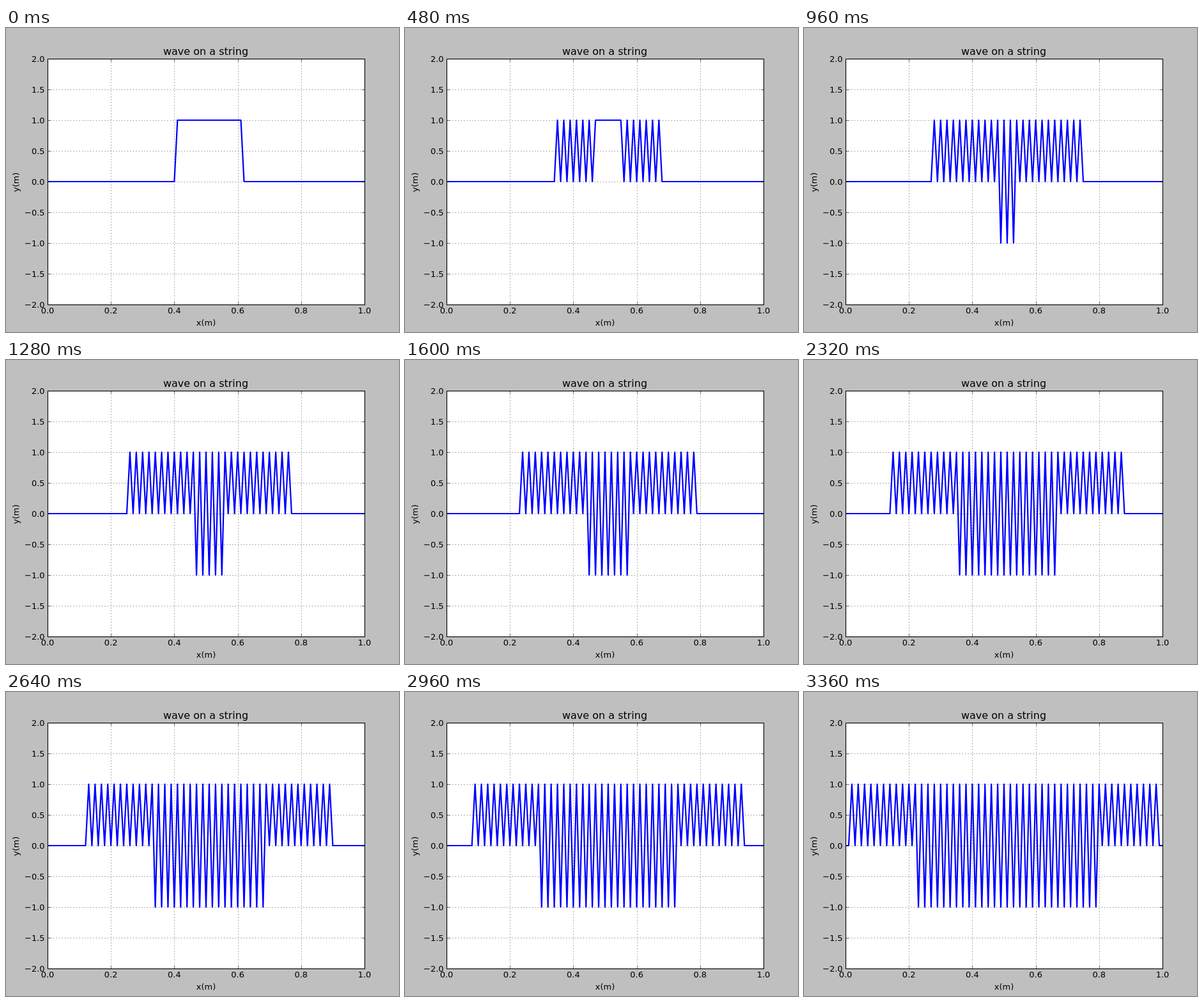
Write an HTML page with a canvas that moves like this. It is 615 by 475 pixels and loops after 3600 ms.

```html
<!DOCTYPE html>
<html lang="en">
<head>
<meta charset="utf-8">
<title>wave on a string</title>
<style>
html, body { margin: 0; width: 615px; height: 475px; overflow: hidden; background: #bfbfbf; }
canvas { display: block; }
</style>
</head>
<body>
<canvas id="stage" width="615" height="475"></canvas>
<script>
const ctx = document.getElementById('stage').getContext('2d');
const FONT = '"DejaVu Sans", sans-serif';
const LABEL = 13, TITLE = 16;
const PT = 80 / 72;
const BOX = { x: 65, y: 48, w: 496, h: 384 };
const TICK = 4 * PT;
const POINTS = 101;
const LOOP = 3600, SLOT = 80;

// Time slots at which the plot refreshes, and the solver step shown at each.
const SLOTS = [0, 1, 2, 4, 6, 7, 8, 10, 11, 12, 14, 16, 18, 20, 21, 22, 23, 25,
  27, 29, 31, 33, 34, 35, 36, 37, 38, 40, 42];
const STEPS = [0, 1, 2, 4, 6, 8, 9, 11, 12, 13, 14, 15, 16, 17, 18, 20, 21, 24,
  25, 26, 27, 28, 29, 30, 31, 32, 33, 36, 39];

const px = x => BOX.x + BOX.w * x;
const py = y => BOX.y + BOX.h * (2 - y) / 4;
const snap = v => Math.floor(v + 0.5) + 0.5;

// Finite-difference wave equation with fixed ends, released from rest.
function solve(count) {
  let now = Array.from({ length: POINTS }, (_, i) => (i > 40 && i < 62 ? 1 : 0));
  let old = now;
  const states = [now];
  for (let n = 0; n < count; n++) {
    const next = now.map((v, i) =>
      i === 0 || i === POINTS - 1 ? 0 : now[i - 1] + now[i + 1] - old[i]);
    old = now;
    now = next;
    states.push(now);
  }
  return states;
}
const states = solve(STEPS[STEPS.length - 1]);

function line(x1, y1, x2, y2) {
  ctx.beginPath();
  ctx.moveTo(x1, y1);
  ctx.lineTo(x2, y2);
  ctx.stroke();
}

function text(str, x, y, size, align) {
  ctx.font = size + 'px ' + FONT;
  ctx.textAlign = align;
  ctx.fillText(str, x, y);
}

const xTicks = [0, 1, 2, 3, 4, 5].map(i => i / 5);
const yTicks = [-4, -3, -2, -1, 0, 1, 2, 3, 4].map(i => i / 2);
const left = snap(BOX.x), right = snap(BOX.x + BOX.w);
const top_ = snap(BOX.y), bottom = snap(BOX.y + BOX.h);

function drawGrid() {
  ctx.strokeStyle = '#000';
  ctx.lineWidth = 0.5 * PT;
  ctx.setLineDash([PT, 3 * PT]);
  for (const x of xTicks) line(snap(px(x)), bottom, snap(px(x)), top_);
  for (const y of yTicks) line(left, snap(py(y)), right, snap(py(y)));
  ctx.setLineDash([]);
}

function drawWave(u) {
  ctx.save();
  ctx.beginPath();
  ctx.rect(BOX.x, BOX.y, BOX.w, BOX.h);
  ctx.clip();
  ctx.strokeStyle = '#00f';
  ctx.lineWidth = 2 * PT;
  ctx.lineJoin = 'round';
  ctx.beginPath();
  u.forEach((v, i) => ctx.lineTo(px(i / (POINTS - 1)), py(v)));
  ctx.stroke();
  ctx.restore();
}

function drawAxes() {
  ctx.strokeStyle = ctx.fillStyle = '#000';
  ctx.lineWidth = PT;
  ctx.strokeRect(left, top_, BOX.w, BOX.h);
  ctx.lineWidth = 0.5 * PT;
  for (const v of xTicks) {
    const x = snap(px(v));
    line(x, bottom, x, bottom - TICK);
    line(x, top_, x, top_ + TICK);
    text(v.toFixed(1), px(v), 446, LABEL, 'center');
  }
  for (const v of yTicks) {
    const y = snap(py(v));
    line(left, y, left + TICK, y);
    line(right, y, right - TICK, y);
    text(v.toFixed(1).replace('-', '\u2212'), BOX.x - TICK, py(v) + 5, LABEL, 'right');
  }
  text('wave on a string', 312.5, 42, TITLE, 'center');
  text('x(m)', 313, 465, LABEL, 'center');
  ctx.save();
  ctx.translate(20, 241);
  ctx.rotate(-Math.PI / 2);
  text('y(m)', 0, 0, LABEL, 'center');
  ctx.restore();
}

function draw(ms) {
  const slot = Math.floor((ms % LOOP) / SLOT);
  let k = SLOTS.length - 1;
  while (SLOTS[k] > slot) k--;
  ctx.fillStyle = '#bfbfbf';
  ctx.fillRect(0, 0, 615, 475);
  ctx.fillStyle = '#fff';
  ctx.fillRect(BOX.x, BOX.y, BOX.w, BOX.h);
  drawGrid();
  drawWave(states[STEPS[k]]);
  drawAxes();
}

const start = performance.now();
function tick() {
  draw(performance.now() - start);
  requestAnimationFrame(tick);
}
tick();
</script>
</body>
</html>
```
